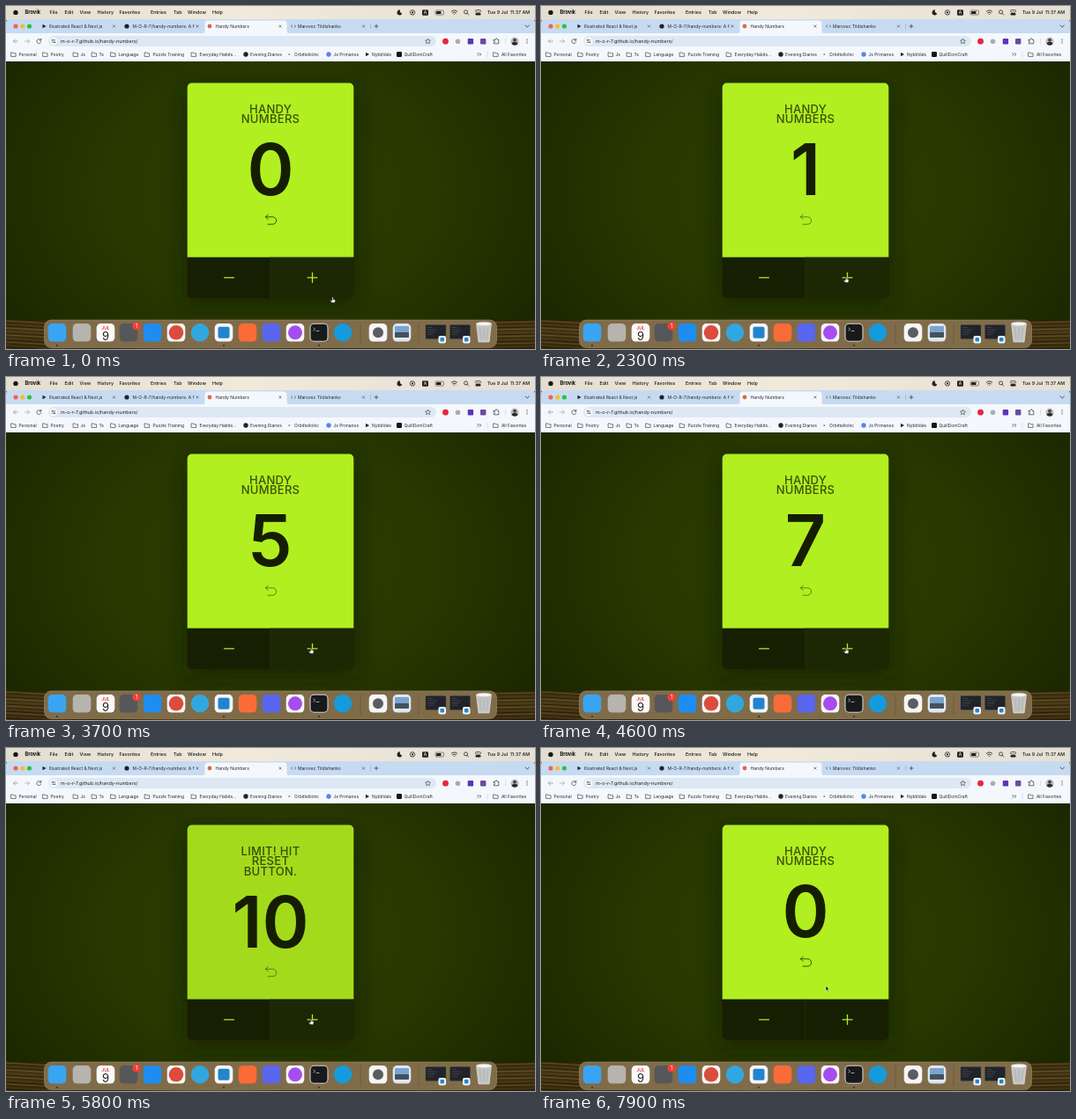
An HTML page for the animation above (8 s loop, 600 px wide and 390 px high).

```html
<!DOCTYPE html>
<html lang="en">
<head>
<meta charset="utf-8">
<title>Handy Numbers</title>
<style>
html, body { margin: 0; width: 100%; height: 100%; overflow: hidden; background: #1c2800; }
svg { display: block; width: 600px; height: 390px; font-family: Inter, Roboto, sans-serif; }
</style>
</head>
<body>
<svg id="stage" viewBox="0 0 600 390" xmlns="http://www.w3.org/2000/svg"></svg>
<script>
const LOOP = 8000;
const stage = document.getElementById('stage');

// Markup helpers
const rect = (x, y, w, h, fill, r = 0, more = '') =>
  `<rect x="${x}" y="${y}" width="${w}" height="${h}" rx="${r}" fill="${fill}" ${more}/>`;
const disc = (x, y, r, fill) => `<circle cx="${x}" cy="${y}" r="${r}" fill="${fill}"/>`;
const line = (d, color = '#444', w = .8, more = '') =>
  `<path d="${d}" fill="none" stroke="${color}" stroke-width="${w}" stroke-linecap="round" stroke-linejoin="round" ${more}/>`;
const label = (x, y, str, size = 5, fill = '#26282b', more = '') =>
  `<text x="${x}" y="${y}" font-size="${size}" fill="${fill}" ${more}>${str.replace(/&/g, '&amp;')}</text>`;

function menuBar() {
  const menus = [[49.5, 'File'], [66.5, 'Edit'], [83.5, 'View'], [103.5, 'History'], [128.5, 'Favorites'],
    [164, 'Entries'], [190, 'Tab'], [206, 'Window'], [234, 'Help']];
  return rect(0, 0, 600, 16, 'url(#sky)') + disc(11, 7.4, 2.7, '#161616') +
    label(21.5, 9.4, 'Brovik', 5.7, '#111', 'font-weight="700"') +
    menus.map(([x, s]) => label(x, 9.4, s, 5.4, '#151515', 'font-weight="500"')).join('') +
    '<path d="M447 4.4A3 3 0 1 0 449.3 8.6 3 3 0 0 1 447 4.4Z" fill="#222"/>' +
    '<circle cx="461" cy="7.4" r="2.7" fill="none" stroke="#222" stroke-width=".8"/>' + disc(461, 7.4, 1.1, '#222') +
    rect(472, 4.3, 7, 6.4, '#222', 1.3) + label(475.5, 9.3, 'A', 5, '#fff', 'text-anchor="middle"') +
    rect(487, 5, 9.5, 5, 'none', 1.3, 'stroke="#555" stroke-width=".7"') + rect(488, 6, 5.5, 3, '#222', .6) +
    line('M505.3 6.2Q508.5 3.4 511.7 6.2M506.6 7.8Q508.5 6.2 510.4 7.8M508.5 9.5V9.6', '#222', .9) +
    '<circle cx="521.5" cy="6.8" r="2" fill="none" stroke="#222" stroke-width=".8"/>' + line('M523 8.3L524.6 10', '#222') +
    rect(532.5, 4.5, 6, 2.5, 'none', 1.2, 'stroke="#222" stroke-width=".7"') + rect(532.5, 8, 6, 2.5, '#222', 1.2) +
    label(546, 9.4, 'Tue 9 Jul', 5.3, '#151515', 'font-weight="500"') +
    label(594, 9.4, '11:37 AM', 5.3, '#151515', 'font-weight="500" text-anchor="end"');
}

function tabStrip() {
  const close = x => line(`M${x - 1.2} 21.8l2.4 2.4m0-2.4l-2.4 2.4`, '#444', .6);
  return '<path d="M0 63V19Q0 15 4 15H596Q600 15 600 19V63Z" fill="#c6dbf2"/>' +
    disc(11, 23, 2.6, '#f55f56') + disc(18.8, 23, 2.6, '#f9bb2e') + disc(26.5, 23, 2.6, '#2ac440') +
    '<path d="M222 31.5Q225.5 31.5 225.5 28V20Q225.5 16.5 229 16.5H315Q318.5 16.5 318.5 20V28Q318.5 31.5 322 31.5Z" fill="#f4f8fc"/>' +
    '<path d="M41.5 20.8L45.5 23L41.5 25.2Z" fill="#222"/>' +
    label(49, 24.9, 'Illustrated React & Next.js') + close(122.5) +
    disc(137, 23, 2.6, '#222') + label(143.5, 24.9, 'M-O-R-7/handy-numbers: A f') + close(217) +
    disc(231, 23, 2.4, '#d9694b') + label(237.5, 24.9, 'Handy Numbers') + close(311) +
    line('M324.7 21.8l-1.4 1.2l1.4 1.2m2.6-2.4l1.4 1.2l-1.4 1.2', '#555', .7) +
    label(331, 24.9, 'Marovec Tildishanko') + close(405.5) +
    line('M413.5 20.5V25.5', '#8fa5c4', .6) + line('M418 23H422M420 21V25', '#333', .7) +
    line('M589 22l2.2 2l2.2-2', '#333', .8);
}

function toolBar() {
  return rect(0, 31, 600, 32, '#f4f8fc') + rect(48, 34, 440, 12, '#dde8f4', 6) +
    line('M13.5 40H8.5M10.7 37.8L8.5 40L10.7 42.2', '#999') +
    line('M21.5 40H26.5M24.3 37.8L26.5 40L24.3 42.2', '#aaa') +
    line('M39.4 38.6A2.5 2.5 0 1 0 39.8 40.8M39.8 37.2V39H38', '#444') +
    disc(54, 40, 4.2, '#fff') + line('M52 38.8H56M52 41.2H56', '#444', .7) +
    disc(53, 38.8, .8, '#444') + disc(55, 41.2, .8, '#444') +
    label(62, 42, 'm-o-r-7.github.io/handy-numbers/', 5.4, '#202124') +
    '<path d="M478.5 37l.9 2 2.1.2-1.6 1.4.5 2.1-1.9-1.1-1.9 1.1.5-2.1-1.6-1.4 2.1-.2Z" fill="none" stroke="#333" stroke-width=".6"/>' +
    disc(498.5, 40.2, 3.4, '#e5283d') + disc(512.5, 40.2, 2.8, '#a9adb2') +
    rect(523.7, 37, 6.4, 6.4, '#5b35b8', 1) + rect(538, 37, 6.4, 6.4, '#6a4aa2', 1) +
    line('M553.3 38.4H555Q555 36.8 556.2 36.8T557.4 38.4H558.8V42.8H553.3V41.5Q554.7 41.5 554.7 40.6T553.3 39.7Z', '#333', .7) +
    line('M566.5 37V43', '#c5d7f1', .7) +
    disc(577, 40.2, 4.6, '#b6c1c4') + disc(577, 38.7, 1.9, '#533f36') +
    '<path d="M573.4 43Q574 40.8 577 40.8T580.6 43A4.6 4.6 0 0 1 573.4 43Z" fill="#35262a"/>' +
    [37.9, 40, 42.1].map(y => disc(591, y, .6, '#333')).join('');
}

function bookmarkBar() {
  const folder = x => line(`M${x - 2.5} 52.9h1.8l.8.9h2.5v3.6h-5.1Z`, '#444', .7);
  const folders = [[8.5, 14.5, 'Personal'], [44.5, 50.5, 'Poetry'], [79, 84.5, 'Js'], [100, 105.5, 'Ts'],
    [121.5, 127.5, 'Language'], [160, 166.5, 'Puzzle Training'], [213, 219.5, 'Everyday Habits...'], [555.5, 562, 'All Favorites']];
  const sites = [[277, 'Evening Diaries'], [327, 'OrbittelloInc'], [371.5, 'Js Primaries'], [415, 'NybbVale'], [451.5, 'QuillDomCraft']];
  return [...folders.map(([i, x, s]) => folder(i) + label(x, 57, s, 4.9)),
    ...sites.map(([x, s]) => label(x, 57, s, 4.9))].join('') +
    disc(272, 55, 2.7, '#222') + disc(321.3, 55, 1, '#8b8b8b') + disc(366, 55, 2.7, '#5b83ed') +
    '<path d="M408 52.8L412 55L408 57.2Z" fill="#222"/>' + rect(443, 52, 6, 6, '#171717', 1.2) +
    line('M534.8 53.5l1.5 1.5l-1.5 1.5m2.5-3l1.5 1.5l-1.5 1.5', '#333', .7) + line('M546 52V58', '#c5d7f1', .7);
}

function landscape() {
  let rows = '';
  for (let i = 0; i < 18; i++) {
    const y = 356 + i * 2;
    const tint = ['#1e1907', '#6f5629', '#2e240c', '#4c3b18'][i % 4];
    rows += line(`M0 ${y}Q150 ${y + 10} 300 ${y + 7}T600 ${y + 1}`, tint, 1, 'opacity=".75"');
  }
  return rect(0, 350, 600, 40, 'url(#soil)') + rows;
}

function dock() {
  const tile = (x, fill) => rect(x - 10.3, 361, 20.6, 20.6, fill, 4.8);
  const onWhite = (x, color, r) => tile(x, '#f5f5f5') + disc(x, 371.3, r, color);
  const tiles = [[58, '#39a5f2'], [86, '#b7b3ae'], [139, '#55575b'], [166, '#1e8df2'], [274, '#fa6b38'],
    [301, '#5966ee']];
  const mini = x => rect(x - 11.5, 362.5, 23, 16, '#20242a', 1, 'stroke="#4b5056" stroke-width=".4"') +
    [0, 1, 2, 3].map(i => line(`M${x - 9} ${365.5 + i * 2.6}h${5 + i * 5 % 7}`, '#5b6066', .5)).join('') +
    rect(x + 3, 375, 8.5, 8.5, '#f4f6f8', 2) + rect(x + 5, 377, 4.5, 4.5, '#2586d2', .8);
  return rect(43.5, 357, 513, 31.5, '#836f4c', 8, 'fill-opacity=".95" stroke="#a08c68" stroke-width=".6"') +
    tiles.map(([x, c]) => tile(x, c)).join('') +
    tile(113, '#fafafa') + label(113, 367.5, 'JUL', 5, '#e23b34', 'text-anchor="middle" font-weight="600"') +
    label(113, 379.5, '9', 13, '#222', 'text-anchor="middle"') +
    disc(148, 364, 4.6, '#f63e36') + label(148, 366.1, '1', 6, '#fff', 'text-anchor="middle"') +
    onWhite(193, '#db4c3c', 8.3) + disc(220, 371.3, 10.3, '#31a7df') +
    tile(247, '#f5f5f5') + rect(240.5, 364.8, 13, 13, '#2284cf', 2) +
    onWhite(328, '#a64cf0', 8) + disc(382, 371.3, 10.3, '#159bdd') +
    rect(345, 361.3, 20, 20, '#17191b', 4.5, 'stroke="#d1d1d1" stroke-width="1.1"') +
    line('M348.8 366l1.8 1.5l-1.8 1.5M352 369.5h3', '#ddd', .7) +
    line('M402 361V384M468 361V384', '#665738', .7) +
    onWhite(422, '#595d62', 6) + tile(449, '#dfe7ee') + rect(441, 364, 16, 13, '#7ba4cf', 1) + rect(441, 371, 16, 6, '#44515e', 1) +
    mini(487.5) + mini(515) +
    '<path d="M533.5 361H550.5L548 382H536Z" fill="#c3c5c4" stroke="#e6e6e4" stroke-width=".7"/>' +
    '<ellipse cx="542" cy="361.5" rx="8.5" ry="2.3" fill="#f5f5f3" stroke="#b7b9b9" stroke-width=".6"/>' +
    line('M537.5 366L539 379M542 366V379M546.5 366L545 379', '#a2a6a7', .6) +
    [58, 247, 355].map(x => disc(x, 386, .9, '#2b241b')).join('');
}

stage.innerHTML = `<defs>
  <linearGradient id="sky"><stop stop-color="#e3ddd0"/><stop offset=".45" stop-color="#f1eadb"/><stop offset="1" stop-color="#e5dfd3"/></linearGradient>
  <linearGradient id="soil" x2="0" y2="1"><stop stop-color="#2c260b"/><stop offset=".5" stop-color="#4f3d19"/><stop offset="1" stop-color="#35290d"/></linearGradient>
  <radialGradient id="page" gradientUnits="userSpaceOnUse" cx="300" cy="208" r="360" gradientTransform="translate(0 52) scale(1 .75)">
    <stop stop-color="#2c3e00"/><stop offset=".5" stop-color="#283900"/><stop offset="1" stop-color="#1b2700"/></radialGradient>
  <filter id="blur" x="-40%" y="-40%" width="180%" height="180%"><feGaussianBlur stdDeviation="12"/></filter>
  <clipPath id="card"><rect x="205.7" y="87.5" width="188.6" height="244.5" rx="5"/></clipPath>
</defs>` +
  landscape() + menuBar() + tabStrip() + toolBar() + bookmarkBar() +
  '<path d="M0 63H600V353Q600 357 596 357H4Q0 357 0 353Z" fill="url(#page)"/>' +
  rect(202, 94, 196, 246, '#0c1300', 8, 'opacity=".55" filter="url(#blur)"') +
  `<g clip-path="url(#card)">
    <rect id="face" x="205" y="87" width="190" height="198.8"/>
    ${rect(205, 285.8, 190, 47, '#161f02')}
    <rect id="hover" x="300" y="285.8" width="95" height="47" fill="#1c2703"/>
    ${line('M300 286V332', '#263407', .7)}
  </g>` +
  line('M247.5 308.8H258.5M342 308.8H353M347.5 303.3V314.3', '#b2ee20', 1.3) +
  '<g id="title" font-size="13" font-weight="500" letter-spacing=".3" text-anchor="middle" fill="#141c02" fill-opacity=".75"></g>' +
  `<g id="body"><text id="count" x="300" y="215.3" font-size="80.5" font-weight="600" text-anchor="middle" fill="#151e02"></text>
    <g id="reset">${line('M297.3 237L294.5 239.8L297.3 242.6M294.5 239.8H302.4A4.2 4.2 0 0 1 302.4 248.2H297', '#151e02', 1)}</g></g>` +
  dock() +
  `<g id="hand"><path d="M-.8 .3Q0-.7.8.3V2.7L3 3.3Q3.7 3.6 3.5 4.6L2.8 7.1H-1.2L-3 4.6Q-2.9 3.4-.8 4.6Z" fill="#fff" stroke="#111" stroke-width=".7" transform="scale(.9)"/></g>
   <g id="arrow"><path d="M0 0V5.6L1.3 4.5L2.2 6.5L3.2 6L2.3 4.1H4Z" fill="#111" stroke="#fff" stroke-width=".5"/></g>`;

const part = Object.fromEntries([...stage.querySelectorAll('[id]')].map(el => [el.id, el]));

const CLICKS = [1900, 2600, 2950, 3300, 3650, 4050, 4450, 4900, 5300, 5650];
const RESET = 7350;
const PATH = [[0, 370.5, 331], [500, 370.5, 331], [1400, 346, 308], [6150, 346, 308], [6850, 300.5, 255.5],
  [7450, 300.5, 255.5], [7850, 323, 270.5], [8000, 323, 270.5]];

const clamp = v => Math.max(0, Math.min(1, v));
const ease = v => v * v * (3 - 2 * v);
const mix = (a, b, k) => a + (b - a) * k;

function pointerAt(t) {
  const i = PATH.findIndex(p => p[0] > t);
  const [t0, x0, y0] = PATH[i - 1], [t1, x1, y1] = PATH[i];
  const k = ease((t - t0) / (t1 - t0));
  return [mix(x0, x1, k), mix(y0, y1, k)];
}

let shownTitle = '';
function setTitle(lines) {
  const key = lines.join();
  if (key === shownTitle) return;
  shownTitle = key;
  part.title.innerHTML = lines.map((s, i) => `<text x="300" y="${122 + i * 11.3}">${s}</text>`).join('');
}

function draw(t) {
  const count = t >= RESET ? 0 : CLICKS.filter(c => c <= t).length;
  const limit = count === CLICKS.length;
  const dim = ease(clamp((t - CLICKS[9]) / 300)) * (1 - ease(clamp((t - RESET) / 300)));
  const [x, y] = pointerAt(t);
  const onPlus = x > 300 && y > 286;
  const onReset = Math.hypot(x - 300, y - (limit ? 254.5 : 243)) < 13;
  const focused = t < CLICKS[0] || t >= RESET;

  setTitle(limit ? ['LIMIT! HIT', 'RESET', 'BUTTON.'] : ['HANDY', 'NUMBERS']);
  part.count.textContent = count;
  part.body.setAttribute('transform', `translate(0 ${limit ? 11.5 : 0})`);
  part.reset.setAttribute('opacity', focused || onReset ? .75 : .5);
  part.face.setAttribute('fill', `rgb(${mix(177, 149, dim)},${mix(239, 200, dim)},${mix(32, 24, dim)})`);
  part.hover.setAttribute('opacity', onPlus ? 1 : 0);

  const clickable = onPlus || onReset;
  part.hand.setAttribute('visibility', clickable ? 'visible' : 'hidden');
  part.arrow.setAttribute('visibility', clickable ? 'hidden' : 'visible');
  for (const p of [part.hand, part.arrow]) p.setAttribute('transform', `translate(${x} ${y})`);
}

const start = performance.now();
function tick() {
  draw((performance.now() - start) % LOOP);
  requestAnimationFrame(tick);
}
tick();
</script>
</body>
</html>
```
